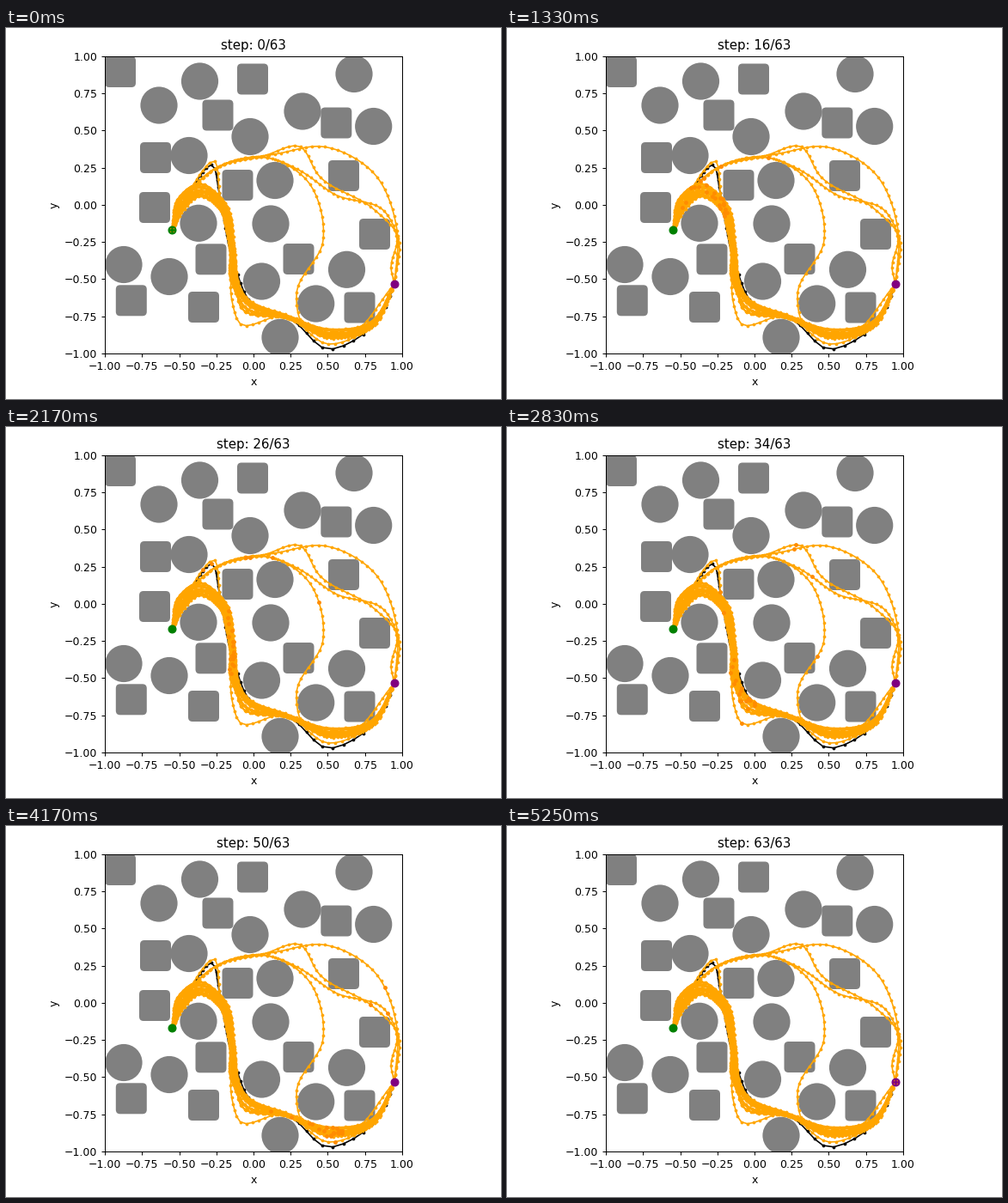
Write a matplotlib script that moves like this. It is 576 by 432 pixels and loops after 5.33 s.

```python
import numpy as np
import matplotlib.pyplot as plt
from matplotlib.animation import FuncAnimation
from matplotlib.patches import Circle, FancyBboxPatch

W, H, DPI = 576, 432, 90
STEPS, STEP_MS = 64, 1000 / 12
FRAMES, FRAME_MS = 205, 26  # fine enough to place every step change
LEFT, BOTTOM, SIDE = 115.125, 53.25, 345.75  # axes square in stage pixels
UNIT = SIDE / 2

DISKS = [(405, 53.5), (225.5, 62), (178, 90), (345, 97), (427.7, 114.5),
         (284, 126.5), (213, 148.5), (313, 177.5), (224, 227.3), (308, 228),
         (137, 275.5), (190, 289.5), (297.5, 295), (396.5, 281.3),
         (360.7, 321), (319, 360.3)]
BOXES = [(133, 51), (287, 59.5), (246.5, 101.5), (384.3, 110.5), (174, 151),
         (269.5, 183), (393, 172), (173, 209), (429, 240), (238.5, 269.3),
         (340.5, 269), (145.8, 317.3), (230, 325), (411.5, 325.5)]

# Waypoints in stage pixels
START, GOAL = (193.4, 235.4), (452.2, 298.2)
RISE = [(206, 202), (243, 164)]
OVER = RISE + [(305, 151)]
HUMP = [(204, 205), (224, 189), (250, 205), (263, 258)]
OUTER = RISE + [(318, 146), (368, 138), (428, 169), (455, 235)]
DIP = RISE + [(300, 149), (342, 138), (364, 172), (428, 211), (455, 240)]
DIAGONAL = OVER + [(342, 166), (383, 194), (441, 214), (455, 245), (448, 280)]
MIDDLE = OVER + [(349, 176), (369, 248), (338, 310), (345, 345), (395, 358)]
LOOP = HUMP + [(263, 318), (272, 344), (325, 335), (375, 368), (425, 347)]
SPIKE = [(206, 204), (243, 155), (249, 200), (266, 275), (280, 319),
         (330, 338), (378, 359), (425, 346)]
BLOCKED = [(207, 204), (241, 160), (248, 192), (267, 280), (286, 321),
           (333, 340), (375, 374), (408, 362), (437, 333)]

# Middle of the bundle and its half width at each waypoint
BUNDLE = HUMP + [(266, 296), (276, 321), (330, 338), (375, 356), (425, 346)]
SPREAD = [8, 9, 8, 4, 4, 8, 3, 6, 4]
STRANDS = 17


def to_world(points):
    origin = LEFT + UNIT, H - BOTTOM - UNIT
    return (np.asarray(points, float) - origin) / UNIT * (1, -1)


def chord_length(points):
    return np.r_[0, np.cumsum(np.hypot(*np.diff(points, axis=0).T))]


def spline(keys, samples=400):
    """Smooth curve through keys, cubic Hermite over chord length."""
    t = chord_length(keys)
    slope = np.gradient(keys, t, axis=0)
    u = np.linspace(0, t[-1], samples)
    i = np.clip(np.searchsorted(t, u, side="right") - 1, 0, len(t) - 2)
    h = (t[i + 1] - t[i])[:, None]
    s = (u - t[i])[:, None] / h
    return ((1 + 2 * s) * (1 - s) ** 2 * keys[i]
            + s * (1 - s) ** 2 * h * slope[i]
            + s ** 2 * (3 - 2 * s) * keys[i + 1]
            + s ** 2 * (s - 1) * h * slope[i + 1])


def route(waypoints, pace):
    """Positions at each step; a higher pace means a slower departure."""
    curve = spline(np.array([START, *waypoints, GOAL], float))
    length = chord_length(curve)
    travelled = length[-1] * np.linspace(0, 1, STEPS) ** pace
    return to_world(np.column_stack(
        [np.interp(travelled, length, axis) for axis in curve.T]))


def strand(rng):
    """One member of the bundle, shifted sideways by a drifting amount."""
    mid = np.array(BUNDLE, float)
    dx, dy = np.gradient(mid, axis=0).T
    normal = np.column_stack([dy, -dx]) / np.hypot(dx, dy)[:, None]
    drift = np.interp(np.arange(len(mid)), [1, 4, 5, 7], rng.uniform(-1, 1, 4))
    shift = (drift * SPREAD)[:, None] * normal
    return route(mid + shift, rng.uniform(0.95, 1.5))


rng = np.random.default_rng(4)
free = [strand(rng) for _ in range(STRANDS)]
free += [route(LOOP, 1.1), route(SPIKE, 2.05), route(MIDDLE, 0.9),
         route(DIAGONAL, 1.03), route(DIP, 1.27), route(OUTER, 1.35)]
blocked = route(BLOCKED, 1.9)

fig = plt.figure(figsize=(W / DPI, H / DPI), dpi=DPI)
ax = fig.add_axes([LEFT / W, BOTTOM / H, SIDE / W, SIDE / H])
ticks = np.linspace(-1, 1, 9)
ax.set(xlim=(-1, 1), ylim=(-1, 1), xticks=ticks, yticks=ticks,
       xlabel="x", ylabel="y")
title = ax.set_title("")

for c in to_world(DISKS):
    ax.add_patch(Circle(c, 21.6 / UNIT, color="gray", lw=0))
for c in to_world(BOXES):
    side = 36 / UNIT
    ax.add_patch(FancyBboxPatch(
        c - side / 2, side, side, color="gray", lw=0,
        boxstyle=f"round,pad=0,rounding_size={5 / UNIT}"))


def draw_routes(paths, color):
    gap = np.full((1, 2), np.nan)
    points = np.vstack([part for path in paths for part in (path, gap)])
    ax.plot(*points.T, color=color, lw=1.3, marker="o", ms=2.4, mew=0.6,
            zorder=3)


def draw_dots(points, color, zorder):
    return ax.scatter(*np.transpose(points), s=8, lw=1, color=color,
                      zorder=zorder)


draw_routes([blocked], "black")
draw_routes(free, "orange")
for spot, color in ((START, "green"), (GOAL, "purple")):
    spot = to_world(spot)
    ax.plot(*spot, "o", color=color, ms=7, zorder=5)
    draw_dots([spot], color, 11)

paths = np.array([blocked, *free])
dots = draw_dots(paths[:, 0], "darkorange", 10)


def update(frame):
    step = int((frame + 1) * FRAME_MS / STEP_MS)
    title.set_text(f"step: {step}/{STEPS - 1}")
    dots.set_offsets(paths[:, step])
    return title, dots


anim = FuncAnimation(fig, update, frames=FRAMES, interval=FRAME_MS,
                     repeat=True, repeat_delay=0)
plt.show()
```
